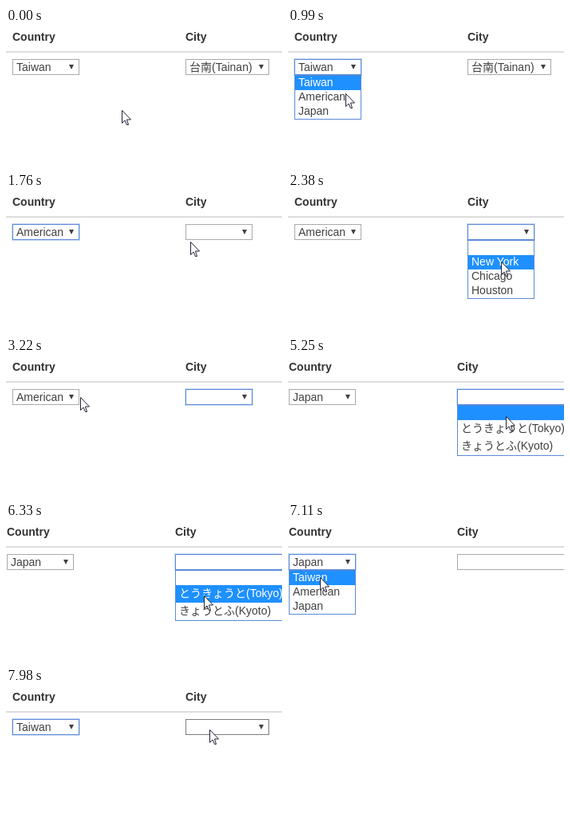
Recreate the animation shown at these times as an HTML page. Size 346x172 px, loop 8000 ms.

```html
<!DOCTYPE html>
<html lang="en">
<head>
<meta charset="utf-8">
<title>Country and city selects</title>
<style>
html, body { margin: 0; width: 100%; height: 100%; overflow: hidden; background: #fff }
svg { display: block; font: 300 14px "Liberation Sans", "Noto Sans CJK JP", "Noto Sans CJK TC", sans-serif; fill: #404040 }
.head { font-weight: bold; fill: #333 }
</style>
</head>
<body>
<svg id="stage" width="346" height="172"></svg>
<script>
const LOOP = 8000, STEP = 77, BLUE = '#5b8ad9';
const stage = document.getElementById('stage');
const countries = ['Taiwan', 'American', 'Japan'];

const layouts = {
  Taiwan: { x: 8, cityX: 225, cityW: 105, cities: [''], rowH: 18 },
  American: { x: 8, cityX: 225, cityW: 84, cities: ['', 'New York', 'Chicago', 'Houston'], rowH: 18 },
  Japan: { x: 1, cityX: 212, cityW: 158, cities: ['', 'とうきょうと(Tokyo)', 'きょうとふ(Kyoto)'], rowH: 22 }
};

const openCountry = { focus: 'country', open: 'country' };
const openCity = { focus: 'city', open: 'city' };
const close = { open: '' };
const pick = country => ({ country, city: '', open: '' });

// start, end, pointer goal x and y, what happens at the start
const moves = [
  [70, 130, 97, 71],
  [290, 440, 77, 50],
  [600, 1060, 72, 84, openCountry],
  [1370, 1986, 286, 53, pick('American')],
  [2063, 2140, 284, 53, openCity],
  [2210, 2530, 258, 104],
  [2760, 2920, 108, 47],
  [3080, 3310, 78, 50, close],
  [3388, 3850, 75, 99, openCountry],
  [4010, 4010, 62, 103],
  [4240, 4690, 284, 50, pick('Japan')],
  [4860, 5030, 278, 62, openCity],
  [5180, 5490, 264, 94],
  [6330, 6720, 45, 50],
  [6880, 6880, 44, 50, close],
  [6957, 7110, 40, 68, openCountry],
  [7260, 7260, 39, 68],
  [7410, 7980, 255, 52, pick('Taiwan')]
];

const ease = k => k * k * (3 - 2 * k);

// the pointer advances in even steps, the first one at the start of each move
function stateAt(t) {
  const s = { country: 'Taiwan', city: '台南(Tainan)', focus: '', open: '', x: 145, y: 103 };
  for (const [start, end, x, y, change] of moves) {
    if (t < start) break;
    const n = Math.round((end - start) / STEP) + 1;
    const dt = (end - start) / (n - 1) || 1;
    const k = ease(Math.min(1, Math.floor((t - start) / dt + 1.12) / n));
    s.x = Math.round(s.x + (x - s.x) * k);
    s.y = Math.round(s.y + (y - s.y) * k);
    Object.assign(s, change);
  }
  return s;
}

const text = (x, y, s, attr = '') => `<text x="${x}" y="${y}" ${attr}>${s}</text>`;
const frame = (x, y, w, h, color, fill = '#fff') =>
  `<rect x="${x + .5}" y="${y + .5}" width="${w - 1}" height="${h - 1}" fill="${fill}" stroke="${color}"/>`;

function select(x, w, label, focused, tip) {
  const hover = tip.x >= x && tip.x < x + w && tip.y >= 39 && tip.y < 59;
  const ring = focused ? frame(x - 1, 38, w + 2, 22, '#c9dcf6', 'none') : '';
  return ring + frame(x, 39, w, 20, focused ? BLUE : hover ? '#7b7b7b' : '#a9a9a9') +
    text(x + 5, 54, label) + `<path d="M${x + w - 13} 46h6l-3 6z"/>`;
}

// the highlight trails the pointer tip by a few pixels
function popup(x, w, options, rowH, pointerY) {
  let y = 60, rows = '';
  options.forEach((label, i) => {
    const h = label ? rowH : 18, hit = pointerY - 5;
    const active = (hit >= y || i === 0) && hit < y + h;
    if (active) rows += `<rect x="${x + 1}" y="${y}" width="${w - 2}" height="${h}" fill="#1e90ff"/>`;
    rows += text(x + 5, y + h / 2 + 4, label, active ? 'fill="#fff"' : '');
    y += h;
  });
  return frame(x, 59, w, y - 58, BLUE) + rows;
}

function render(t) {
  const s = stateAt(t);
  const { x, cityX, cityW, cities, rowH } = layouts[s.country];
  return text(x, 16, 'Country', 'class="head"') +
    text(cityX, 16, 'City', 'class="head"') +
    '<rect y="29" width="346" height="2" fill="#ddd"/>' +
    select(x, 84, s.country, s.focus === 'country', s) +
    select(cityX, cityW, s.city, s.focus === 'city', s) +
    (s.open === 'country' ? popup(x, 84, countries, 18, s.y) : '') +
    (s.open === 'city' ? popup(cityX, cityW, cities, rowH, s.y) : '') +
    `<path transform="translate(${s.x} ${s.y})" fill="#fff" stroke="#223"
      d="M.5 .5V16.5L4 13L6.5 18.5H8.5L6.5 12H11.5Z"/>`;
}

let shown = '';
function tick() {
  const picture = render(performance.now() % LOOP);
  if (picture !== shown) stage.innerHTML = shown = picture;
  requestAnimationFrame(tick);
}
tick();
</script>
</body>
</html>
```
